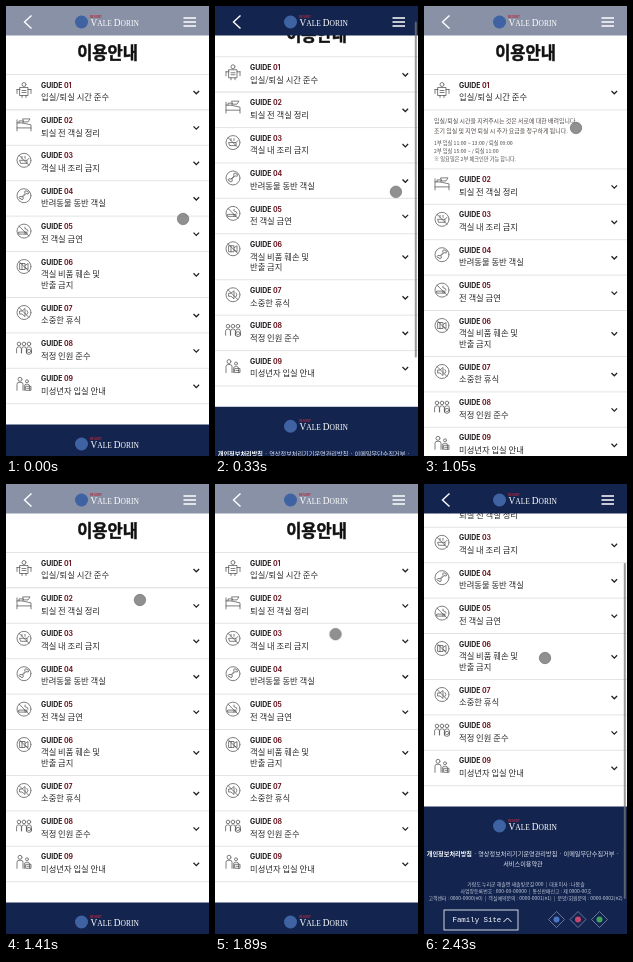
Animation of 203x450 px, one loop 2.46 s. Source, as an HTML page:

```html
<!DOCTYPE html>
<html>
<head>
<meta charset="utf-8">
<title>이용안내</title>
<style>
html, body { margin: 0; width: 100%; height: 100%; overflow: hidden; background: #fff; }
svg { display: block; width: 100vw; height: 100vh; }
text { font-family: "Noto Sans CJK KR", "Noto Sans CJK", "Noto Sans", sans-serif; white-space: pre; }
.title { font-size: 16.5px; font-weight: 900; fill: #111; stroke: #111; stroke-width: .45; }
.guide { font: 700 6.9px Inter, sans-serif; fill: #1b1718; }
.no { fill: #6b1722; }
.label { font-size: 8.3px; fill: #2b2b2b; }
.icon { fill: none; stroke: #555; stroke-width: .75; stroke-linecap: round; stroke-linejoin: round; }
.chev { fill: none; stroke: #222; stroke-width: 1.3; }
.rule { stroke: #dcdcdc; stroke-width: .8; }
.white { fill: none; stroke: #fff; }
.brand { font-family: "Liberation Serif", serif; font-size: 7.5px; fill: #fff; }
.cap { font-size: 9.4px; }
.tag { font-size: 3px; font-weight: 700; fill: #b3283c; }
.note { font-size: 5.95px; fill: #4f4845; }
.small { font-size: 5.2px; fill: #4f4b4a; }
.link { font-size: 6.15px; fill: #e4e7ef; }
.info { font-size: 4.95px; fill: #bfc6d8; }
.mid { text-anchor: middle; }
.mono { font: 7.4px "Liberation Mono", monospace; fill: #fff; }

#page, #rest, #bar, #head, #thumb, #dot { animation: 2460ms linear infinite; }
#page { animation-name: scroll; }
#thumb { animation-name: thumb; }
#bar { animation-name: bar; }
#head { animation-name: head; }
#rest { animation-name: fold; animation-timing-function: ease-in-out; }
#dot { animation-name: dot; }

@keyframes scroll {
  0%, 7% { transform: translateY(0); animation-timing-function: ease-in; }
  13.41% { transform: translateY(-17px); }
  18.3%, 20.7% { transform: translateY(-96px); animation-timing-function: ease-out; }
  25.2%, 87% { transform: translateY(0); animation-timing-function: ease-in-out; }
  98%, 100% { transform: translateY(-96px); }
}
@keyframes thumb {
  0%, 7% { transform: translateY(0); animation-timing-function: ease-in; }
  13.41% { transform: translateY(14px); }
  18.3%, 20.7% { transform: translateY(78px); animation-timing-function: ease-out; }
  25.2%, 87% { transform: translateY(0); animation-timing-function: ease-in-out; }
  98%, 100% { transform: translateY(78px); }
}
@keyframes bar {
  0%, 7% { opacity: 0; }
  9%, 25.2% { opacity: 1; }
  28%, 87% { opacity: 0; }
  89%, 100% { opacity: 1; }
}
@keyframes head {
  0%, 7% { fill-opacity: .5; }
  11%, 25.2% { fill-opacity: 1; }
  29%, 87% { fill-opacity: .5; }
  91%, 100% { fill-opacity: 1; }
}
@keyframes fold {
  0%, 34.8% { transform: translateY(0); }
  40.5%, 50% { transform: translateY(59px); }
  56%, 100% { transform: translateY(0); }
}
@keyframes dot {
  0% { transform: translate(177px, 213px); }
  13.41% { transform: translate(181px, 186px); }
  31.71% { transform: translate(145px, 106px); }
  35% { transform: translate(146px, 101px); }
  42.68% { transform: translate(152px, 122px); }
  50% { transform: translate(146px, 103px); }
  65.85% { transform: translate(120px, 131px); }
  86.59% { transform: translate(121px, 167px); }
  98.78%, 100% { transform: translate(121px, 174px); }
}
</style>
</head>
<body>
<svg viewBox="0 0 203 450" preserveAspectRatio="none">
  <defs>
    <g id="logo">
      <circle cx="75.500" cy="16" r="6.500" fill="#3f62a3"/>
      <text class="tag" x="84" y="11.500">RESORT</text>
      <text class="brand" x="84.500" y="19.500"><tspan class="cap">V</tspan>ALE <tspan class="cap">D</tspan>ORIN</text>
    </g>
  </defs>
  <rect width="203" height="450" fill="#fff"/>
  <g id="page">
    <text class="title mid" x="101.500" y="53">이용안내</text>
    <g id="first"></g>
    <g id="panel">
      <text class="note" x="10" y="116.500">입실/퇴실 시간을 지켜주시는 것은 서로에 대한 배려입니다.</text>
      <text class="note" x="10" y="127">조기 입실 및 지연 퇴실 시 추가 요금을 청구하게 됩니다.</text>
      <text class="small" x="10" y="138.500">1부 입실 11:00 ~ 13:00 / 퇴실 09:00</text>
      <text class="small" x="10" y="147.300">2부 입실 15:00 ~ / 퇴실 11:00</text>
      <text class="small" x="10" y="155.300">※ 일요일은 2부 체크인만 가능 합니다.</text>
    </g>
    <g id="rest">
      <rect y="103.900" width="203" height="500" fill="#fff"/>
      <g id="rows"></g>
      <g transform="translate(0 418.500)">
        <rect width="203" height="240" fill="#13244f"/>
        <use href="#logo" y="3.500"/>
        <text class="link mid" x="99" y="49.600"><tspan font-weight="700" fill="#fff">개인정보처리방침</tspan> · 영상정보처리기기운영관리방침 · 이메일무단수집거부 ·</text>
        <text class="link mid" x="99" y="59.600">서비스이용약관</text>
        <text class="info mid" x="102" y="79.300">가람도 누리군 해솔면 새솔빛로길 000  |  대표이사 : 나봄솔</text>
        <text class="info mid" x="102" y="86.300">사업장등록번호 : 000-00-00000  |  통신판매신고 : 제 0000-00호</text>
        <text class="info mid" x="101.500" y="93.300">고객센터 : 0000-0000(#0)  |  객실예약문의 : 0000-0001(#1)  |  분양/회원문의 : 0000-0002(#2)</text>
        <rect class="white" x="20" y="103.500" width="74" height="20" stroke-width=".8"/>
        <text class="mono" x="28.500" y="115.800">Family Site</text>
        <path class="white" d="M79.500 115.500l4-4 4 4"/>
        <g id="social"></g>
      </g>
    </g>
  </g>
  <rect id="head" width="203" height="29.500" fill="#13244f"/>
  <use href="#logo"/>
  <path class="white" stroke-width="1.400" d="M25.500 9.500l-7 6.500 7 6.500"/>
  <path class="white" stroke-width="1.700" d="M177.500 12h12.500M177.500 16h12.500M177.500 20h12.500"/>
  <g id="bar"><rect id="thumb" x="199.800" y="1" width="2" height="336" rx="1" fill="#777" fill-opacity=".75"/></g>
  <circle id="dot" r="5.700" fill="#777" fill-opacity=".82" stroke="#666" stroke-opacity=".8" stroke-width=".8"/>
</svg>
<script>
const $ = id => document.getElementById(id);
const ring = 'M7 0A7 7 0 1 1-7 0A7 7 0 1 1 7 0';
const slash = ring + 'M-5-5L5 5';
const face = (x, y, r) => `M${x + r} ${y}a${r} ${r} 0 1 1-${2 * r} 0a${r} ${r} 0 1 1 ${2 * r} 0`;
const torso = (x, y, w, h) => `M${x - w} ${y + h}v-${h - 2}q0-2 2-2h${2 * w - 4}q2 0 2 2v${h - 2}`;

const guides = [
  ['입실/퇴실 시간 준수', face(0, -5, 2) + 'M-4-2h8v8h-8zM-7 0h3M4 0h3M-7 0v4M7 0v4M-2 6v2M2 6v2M-2 1h4M-2 3h4'],
  ['퇴실 전 객실 정리', 'M-7-5v11M-7 3h14v3M7 3v-3l-9-2h-5M-5-2v-2h4v2M-1-6h7l-2 3h-4z'],
  ['객실 내 조리 금지', slash + 'M-4 0h7v3h-6zM3 0l2-2M-2-2v-2M1-2v-2'],
  ['반려동물 동반 객실', ring + 'M-2 1l3-3q-1-3 1-3q1 0 1 1q2 0 2 1q0 2-3 1l-3 3q1 3-1 3q-1 0-1-1q-2 0-2-1q0-2 3-1'],
  ['전 객실 금연', slash + 'M-5 1h8v2h-8zM1 1v2M4 0q0-2-2-2t-1-2'],
  ['객실 비품 훼손 및|반출 금지', slash + 'M-4-3h5v6h-5zM1-1l3-2v6l-3-2M-2-3v6'],
  ['소중한 휴식', slash + 'M-4-1.500h2l3-2.500v8l-3-2.500h-2zM3-2q2 2 0 4'],
  ['적정 인원 준수', [-5, 0, 5].map(x => face(x, -4, 1.8) + torso(x, -1, 2.4, 6)).join('') + face(5, 4, 2.5) + 'M4 4l1 1 2-2'],
  ['미성년자 입실 안내', face(-4, -4, 2) + torso(-4, -1, 3, 8) + face(3, -2, 1.5) + torso(3, 1, 2.6, 6) + 'M2 3h5v4h-5zM3 5h3']
];

let rowY = 68.5;
guides.forEach(([label, icon], i) => {
  const lines = label.split('|');
  const height = lines.length > 1 ? 46 : 35.4;
  const edge = i == 0 || i == 8 ? `M0 ${height}h203` : '';
  $(i ? 'rows' : 'first').innerHTML += `<g transform="translate(0 ${rowY})">
    <path class="rule" d="M0 0h203${edge}"/>
    <path class="icon" transform="translate(18 15)" d="${icon}"/>
    <text class="guide" x="35" y="13.200">GUIDE <tspan class="no">0${i + 1}</tspan></text>
    ${lines.map((s, n) => `<text class="label" x="35" y="${25.8 + n * 10.8}">${s}</text>`).join('')}
    <path class="chev" d="M187.500 ${height / 2 - 1.2}l2.800 2.800 2.800-2.800"/>
  </g>`;
  rowY += height;
});

$('social').innerHTML = ['#4a74c4', '#c2476a', '#3fa35c'].map((c, i) =>
  `<g transform="translate(${132.5 + i * 21.5} 113)">
    <path d="M0-8l8 8-8 8-8-8z" fill="none" stroke="#8d98b5" stroke-width=".7"/>
    <circle r="3" fill="${c}"/>
  </g>`).join('');
</script>
</body>
</html>
```
